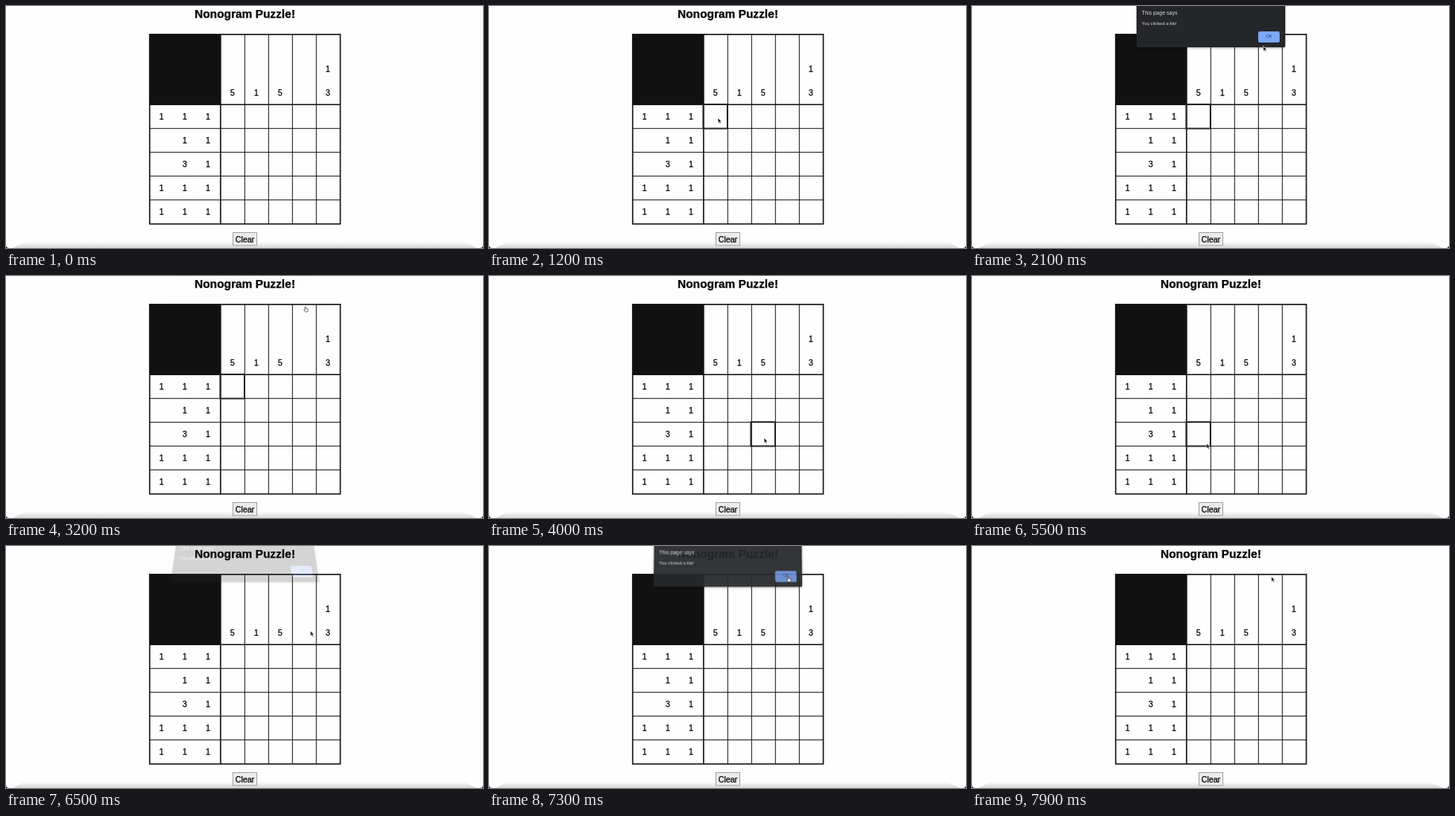
Recreate the animation shown at these times as an HTML page. Size 600x305 px, loop 8000 ms.

```html
<!DOCTYPE html>
<html lang="en">
<head>
<meta charset="utf-8">
<title>Nonogram Puzzle</title>
<style>
  html, body { margin: 0; width: 100%; height: 100%; overflow: hidden; background: #fefefe; }
  #stage { position: relative; width: 600px; height: 305px; overflow: hidden; }
  svg { position: absolute; left: 0; top: 0; }
  svg text { font-family: "Liberation Sans", Arial, sans-serif; fill: #000; stroke: #000; stroke-width: .25; text-anchor: middle; }
  #dialog {
    position: absolute; left: 207px; top: -40px; width: 187px; height: 92px;
    background: #242629; border-radius: 0 0 2px 2px;
    box-shadow: 0 1px 3px rgba(0, 0, 0, .35);
    transform-origin: 50% 100%;
    font-family: Inter, Roboto, sans-serif; color: #e4e5e7; white-space: nowrap;
  }
  #dialog div { position: absolute; left: 6.5px; line-height: 8px; }
  #heading { top: 45px; font-size: 6.3px; }
  #message { top: 57.5px; font-size: 5.35px; }
  #dialog #ok {
    left: 153px; top: 72px; width: 27px; height: 13.5px; line-height: 13.5px;
    border-radius: 2px; text-align: center; font-size: 5px; color: #25365c;
  }
</style>
</head>
<body>
<div id="stage">
  <svg width="600" height="305">
    <defs>
      <linearGradient id="shade" x2="0" y2="1">
        <stop stop-opacity="0"/>
        <stop offset="1" stop-opacity=".16"/>
      </linearGradient>
    </defs>
    <path d="M8 305L24 297H576L592 305Z" fill="url(#shade)"/>
    <path d="M0 301Q0 305 4 305H0ZM600 301Q600 305 596 305H600Z" fill="#222"/>
    <text x="300.5" y="14.5" font-size="14.5" font-weight="bold">Nonogram Puzzle!</text>
    <rect x="181" y="36" width="89" height="88" fill="#111"/>
    <g id="board" stroke="#161616"></g>
    <rect id="ring" width="30.5" height="30.5" fill="none" stroke="#262626" stroke-width="1.8"/>
    <rect x="285.5" y="285.5" width="30" height="16.3" fill="#ececec" stroke="#a4a4a4"/>
    <text x="300.5" y="297.5" font-size="10">Clear</text>
  </svg>
  <div id="dialog">
    <div id="heading">This page says</div>
    <div id="message">You clicked a tile!</div>
    <div id="ok">OK</div>
  </div>
  <svg width="600" height="305">
    <g id="cursor" stroke-linejoin="round">
      <path id="arrow" d="M0 0V6.4L1.5 5.1L2.6 7.5L3.7 7L2.7 4.7H4.6Z" fill="#111" stroke="#fff" stroke-width=".6"/>
      <path id="hand" d="M-.6 3.6V.6Q0 -.3 .6 .6V2.6L3.2 3.2Q3.7 3.6 3.4 5L2.8 6.6H-.2L-1.9 4.3Q-1.5 3.3 -.6 4.1Z" fill="#fff" stroke="#333" stroke-width=".7"/>
    </g>
  </svg>
</div>
<script>
const $ = id => document.getElementById(id);
const LOOP = 8000, STEP = 100, CELL = 30, LEFT = 270, TOP = 124;
const OK = { x: 376.5, y: 38.5 };
const ENTRY = { x: 325, y: 148, at: 500 };

// Each click focuses a tile, opens the alert and ends with a press on OK.
const clicks = [
  { x: 288, y: 141, at: 1200, open: 1500, press: 2800 },
  { x: 346, y: 204, at: 3800, open: 4000, press: 4700 },
  { x: 295, y: 211, at: 5200, open: 5500, press: 5900 },
  { x: 383, y: 107, at: 6300, open: 6400, press: 7150 },
  { x: 372.5, y: 109, at: 7900, open: LOOP, press: LOOP }
];
clicks.forEach((click, i) => {
  click.close = click.press + 100;
  click.leave = Math.max(click.close, (clicks[i + 1]?.at ?? LOOP) - 500);
});

const clamp = x => Math.min(1, Math.max(0, x));
const smooth = x => (x = clamp(x), x * x * (3 - 2 * x));
const easeOut = x => 1 - (1 - clamp(x)) ** 4;

function move(from, to, t, start, end) {
  const k = easeOut((t - start) / (end - start));
  return [from.x + (to.x - from.x) * k, from.y + (to.y - from.y) * k];
}

function buildBoard() {
  const line = (d, width) => `<path d="${d}" stroke-width="${width}"/>`;
  const digit = (x, y, value) => `<text x="${x}" y="${y + 3.8}" font-size="10.2">${value}</text>`;
  const rowClues = ["111", " 11", " 31", "111", "111"];
  const columnClues = [" 5", " 1", " 5", "  ", "13"];
  let markup = "";
  rowClues.forEach((clues, i) => {
    const x = LEFT + i * CELL, y = TOP + i * CELL, width = i ? 1 : 1.6;
    markup += line(`M${i ? x + .3 : x - .1} 36V274M181 ${y + .3}H420`, width);
    [...clues].forEach((c, k) => markup += digit(195.6 + k * 29.3, y + 15.2, c));
    [...columnClues[i]].forEach((c, k) => markup += digit(x + 14.8, 79.3 + k * 29.8, c));
  });
  $("board").innerHTML = markup + '<rect x="180.7" y="35.8" width="239.8" height="238.9" fill="none" stroke-width="1.6"/>';
}

function drawRing(click) {
  const column = Math.floor((click?.x - LEFT) / CELL), row = Math.floor((click?.y - TOP) / CELL);
  const focused = row >= 0;
  $("ring").style.display = focused ? "" : "none";
  if (!focused) return;
  $("ring").setAttribute("x", LEFT + column * CELL - .6);
  $("ring").setAttribute("y", TOP + row * CELL);
}

function drawDialog(click, t) {
  const shown = click ? smooth((t - click.open) / 350) * (1 - smooth((t - click.close) / 320)) : 0;
  const away = 1 - shown;
  $("dialog").style.opacity = shown;
  $("dialog").style.transform = away
    ? `translateY(${-8 * away}px) perspective(126px) rotateX(${14 * away}deg) scaleY(${1 + .1 * away})` : "none";
  $("ok").style.background = click && t >= click.press ? "#6388cc" : "#7ca8f6";
}

function drawCursor(click, next, t) {
  const hand = click && t >= click.close && t < click.leave;
  $("cursor").style.display = t >= ENTRY.at ? "" : "none";
  $("arrow").style.display = hand ? "none" : "";
  $("hand").style.display = hand ? "" : "none";
  const position = !click ? move(ENTRY, next, t, ENTRY.at, next.at)
    : t < click.leave ? move(click, OK, t, click.open + 100, click.press)
    : move(OK, next, t, click.leave, next.at);
  $("cursor").setAttribute("transform", `translate(${position})`);
}

function draw(t) {
  const index = clicks.findLastIndex(click => t >= click.at);
  const click = clicks[index], next = clicks[index + 1];
  drawRing(click);
  drawDialog(click, t);
  drawCursor(click, next, t);
}

function tick(now) {
  draw(Math.floor(now % LOOP / STEP) * STEP);
  requestAnimationFrame(tick);
}

buildBoard();
draw(0);
requestAnimationFrame(tick);
</script>
</body>
</html>
```
